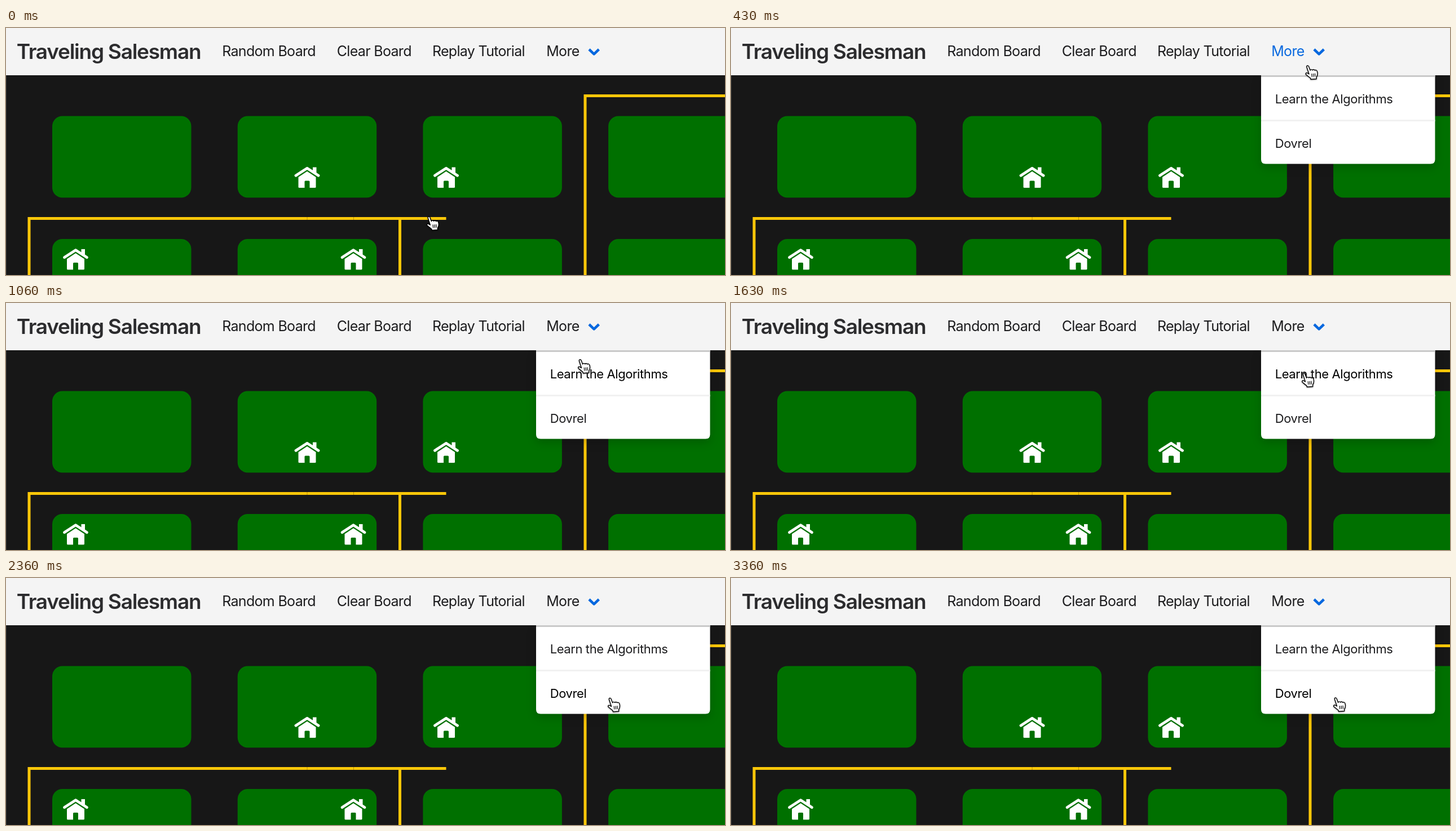
Write an HTML page that moves like this. It is 1275 by 439 pixels and loops after 3390 ms.

```html
<!DOCTYPE html>
<html lang="en">
<head>
<meta charset="utf-8">
<title>Traveling Salesman</title>
<style>
  html, body { margin: 0; width: 100%; height: 100%; overflow: hidden; background: #171717; }
  svg { display: block; }
  text { font-family: Inter, "Open Sans", sans-serif; font-optical-sizing: none; fill: #1c1c1e; }
  .title { font-size: 37px; font-weight: 600; letter-spacing: -1.25px; fill: #2c2c2e; }
  .nav { font-size: 25px; letter-spacing: -.68px; }
  .item { font-size: 22px; letter-spacing: -.41px; }
  #menu { filter: drop-shadow(0 6px 8px rgba(0, 0, 0, .18)); }
  #hand { filter: drop-shadow(0 1px 1px rgba(0, 0, 0, .4)); }
</style>
</head>
<body>
<svg width="1275" height="439" viewBox="0 0 1275 439">
  <defs>
    <g id="house" fill="#fff">
      <path d="M-20-2.8 0-15.8 20-2.8" fill="none" stroke="#fff" stroke-width="4.8" stroke-linecap="round" stroke-linejoin="round"/>
      <path d="M10-17.500h6.500v11L10-10z"/>
      <path d="M-15.500 0 0-10.300 15.500 0V17.500q0 1.500-1.500 1.500H4.500V8q0-1.500-1.500-1.500H-3Q-4.500 6.500-4.500 8V19H-14q-1.500 0-1.500-1.500z"/>
    </g>
  </defs>

  <path d="M.5 84V439" stroke="#333"/>
  <g id="blocks" fill="#007000"></g>
  <g fill="none" stroke="#fdc708" stroke-width="5">
    <path d="M41 439V338.500H780.500M698.500 338.500V439M1027 439V120.500H1275"/>
    <path d="M534 336v5M616.500 336v5" stroke="#8a6b00" stroke-width=".6"/>
  </g>
  <use href="#house" x="534" y="265"/>
  <use href="#house" x="780.500" y="265"/>
  <use href="#house" x="123.500" y="410.500"/>
  <use href="#house" x="616" y="410.500"/>

  <g id="menu">
    <path d="M940 84H1248.500V233.500q0 8-8 8H948q-8 0-8-8z" fill="#fff"/>
    <path d="M940 85.500H1248.500" stroke="#c9c9c9" stroke-width="3"/>
    <path d="M940 164.500H1248.500" stroke="#f1f1f1" stroke-width="3"/>
    <text id="learn" class="item" x="964.700" y="133.500">Learn the Algorithms</text>
    <text id="code" class="item" x="964.700" y="212.500">Dovrel</text>
  </g>

  <path d="M0 0H1275V84H0z" fill="#f4f4f4"/>
  <text class="title" x="18.700" y="55">Traveling Salesman</text>
  <text class="nav" x="383.200" y="50">Random Board</text>
  <text class="nav" x="586.700" y="50">Clear Board</text>
  <text class="nav" x="755.900" y="50">Replay Tutorial</text>
  <text id="more" class="nav" x="958.200" y="50">More</text>
  <path d="M1034 38 1042.700 46.300 1051.400 38" fill="none" stroke="#0768df" stroke-width="4.600" stroke-linejoin="round"/>

  <g id="hand" stroke="#000" stroke-width="1.400" stroke-linejoin="round" stroke-linecap="round">
    <path fill="#fff" d="M3.500 4.500C2.800 2 5.800.8 6.900 3.200L9.600 10.300C10.300 8.500 13 8.300 13.700 10 14.600 8.500 17 8.600 17.700 10.300 19 9.200 21.200 9.700 21.800 11.800 23.300 16.200 22.500 19.500 20.500 22.500L20.700 25.500 10.500 26.200 10 24C8 22.800 5.500 20.500 2.500 18 .8 16.200 2.200 14 4.500 15L7.500 16.800z"/>
    <path d="M12.300 16.500 12.800 21.500M15.200 16.300 15.700 21.300M18 16 18.500 21" stroke-width="1.200"/>
  </g>
</svg>
<script>
  const LOOP = 3390;
  const $ = id => document.getElementById(id);

  for (const y of [156.5, 375])
    for (let col = 0; col < 4; col++)
      $("blocks").innerHTML +=
        `<rect x="${82 + col * 328.7}" y="${y}" width="246.500" height="145" rx="18"/>`;

  // Pointer stops: time, x, y
  const stops = [
    [0, 744, 334], [230, 924, 171], [430, 1017.5, 65], [1060, 1013, 98.5],
    [1630, 1011, 123], [2360, 1066, 211.5], [3390, 1067, 211]
  ];

  const slope = (i, axis) =>
    (stops[i + 1][axis] - stops[i][axis]) / (stops[i + 1][0] - stops[i][0]);

  // Harmonic mean of the neighbouring slopes keeps the curve free of overshoot
  function tangent(i, axis) {
    if (i === 0) return slope(0, axis);
    if (i === stops.length - 1) return 0;
    const a = slope(i - 1, axis), b = slope(i, axis);
    return a * b > 0 ? 2 * a * b / (a + b) : 0;
  }

  function position(t, axis) {
    const i = stops.findIndex((s, k) => t < stops[k + 1][0]);
    const [from, to] = [stops[i], stops[i + 1]];
    const span = to[0] - from[0], u = (t - from[0]) / span, v = 1 - u;
    return from[axis] * v * v * (1 + 2 * u) + to[axis] * u * u * (3 - 2 * u)
      + span * u * v * (v * tangent(i, axis) - u * tangent(i + 1, axis));
  }

  function draw(now) {
    const t = now % LOOP;
    const x = position(t, 1), y = position(t, 2), tipY = y + 2;
    const open = t > 300 && (t > 430 || tipY < 84);
    $("hand").setAttribute("transform", `translate(${x} ${y})`);
    $("menu").style.display = open ? "" : "none";
    $("more").style.fill = open && tipY < 84 ? "#0768df" : "";
    $("learn").style.fill = open && tipY >= 84 && tipY < 164 ? "#000" : "";
    $("code").style.fill = open && tipY >= 164 ? "#000" : "";
    requestAnimationFrame(() => draw(performance.now()));
  }
  draw(0);
</script>
</body>
</html>
```
